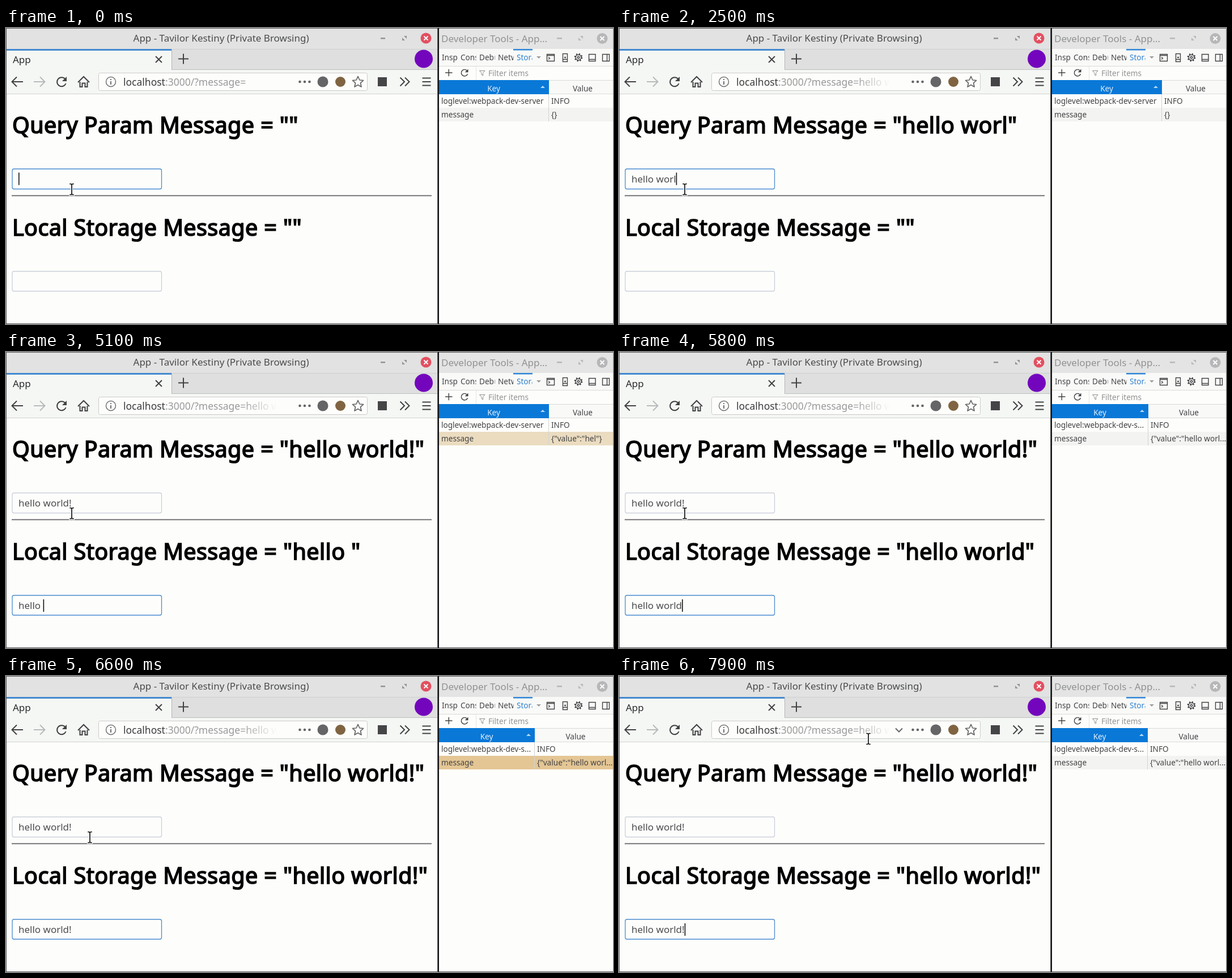
Animation of 1071 by 523 pixels, one loop 8 s. Source, as an HTML page:

```html
<!DOCTYPE html>
<html lang="en">
<head>
<meta charset="utf-8">
<title>App</title>
<style>
  html, body { margin: 0; width: 100%; height: 100%; overflow: hidden; }
  svg { display: block; }
  text { font: 17px "Noto Sans", "Open Sans", sans-serif; fill: #4b4b4d; white-space: pre; }
  /* a thin outline gives the semi-bold weight */
  .h1 { font-size: 39.5px; letter-spacing: .4px; fill: #000; stroke: #000; stroke-width: 1.7; }
  .url { font-size: 17.5px; fill: #98989a; }
  .small text, .small { font-size: 13.6px; fill: #424244; }
  .mid { text-anchor: middle; }
  .line { fill: none; stroke: #414143; stroke-width: 2; }
  .thin .line { stroke-width: 1.4; }
  .field { fill: #fdfefc; stroke-width: 1.3; }
</style>
</head>
<body>
<svg id="stage" width="1071" height="523" viewBox="0 0 1071 523">
  <defs>
    <linearGradient id="fade" gradientUnits="userSpaceOnUse" x1="415" x2="478">
      <stop stop-color="#fff"/><stop offset="1" stop-color="#fff" stop-opacity="0"/>
    </linearGradient>
    <mask id="fadeMask" maskUnits="userSpaceOnUse" x="200" y="75" width="300" height="40">
      <path d="M200 75H478V115H200z" fill="url(#fade)"/>
    </mask>
    <g id="reload"><path class="line" d="M6.2 -5A8 8 0 1 0 7.6 3"/><path d="M9 -9V-1H1z" fill="#414143"/></g>
    <g id="resize"><path d="M-1 -4H4V1zM-4 -1V4H1z"/></g>
    <path id="cross" d="M-3.5 -3.5L3.5 3.5M3.5 -3.5L-3.5 3.5" fill="none"/>
  </defs>

  <rect width="1071" height="523" fill="#56585a"/>
  <path d="M762 0H764V523H762z" fill="#161618"/>

  <!-- browser window -->
  <path d="M1 1H761V522H1z" fill="#fdfefb"/>
  <path d="M1 1H761V37H1z" fill="#e1e2e1"/>
  <path d="M1 37H761V73H1z" fill="#dedfde"/>
  <path d="M1 37.5H761" stroke="#cfcfd1"/>
  <text class="mid" x="379.5" y="24">App - Tavilor Kestiny (Private Browsing)</text>
  <g fill="#929294">
    <path d="M661 17H669V19.5H661z"/><use href="#resize" x="703" y="18"/>
  </g>
  <circle cx="741" cy="18" r="9.5" fill="#e34f60"/>
  <use href="#cross" x="741" y="18" stroke="#fff" stroke-width="2"/>
  <path d="M1 73.5H761" stroke="#bebec0"/>
  <path d="M1 37H292V74H1z" fill="#f5f7f4"/>
  <path d="M1 37H292V40H1z" fill="#4389d0"/>
  <path d="M292.5 38V73" stroke="#b4b4b6"/>
  <text x="12" y="62" style="fill:#2b2b2d">App</text>
  <path class="line" d="M264 50L275 61M275 50L264 61M304 54.5H322M313 45.5V63.5"/>
  <circle cx="737" cy="54.5" r="16" fill="#7306bd"/>

  <path d="M1 74H761V116H1z" fill="#f5f7f4"/>
  <path d="M1 116.5H761" stroke="#d1d2d0"/>
  <path class="line" d="M30 95H11M19 86.5L10.5 95L19 103.5"/>
  <path class="line" style="stroke:#b9b9bb" d="M49 95H68M60 86.5L68.5 95L60 103.5"/>
  <use href="#reload" x="98" y="95"/>
  <path class="line" d="M127 96L137 86L147 96M130.5 95V104H134.5V97.5H139.5V104H143.5V95"/>
  <rect x="163.5" y="79.5" width="474" height="31" rx="3" fill="#fdfefb" stroke="#cbccca"/>
  <circle class="line" style="stroke-width:1.5;stroke:#707072" cx="185" cy="95" r="8.5"/>
  <path d="M184 90H186V92H184zM184 94H186V100H184z" fill="#707072"/>
  <g id="address"><text class="url" x="207" y="102" id="url"><tspan fill="#3a3a3c">localhost</tspan>:3000/?message=<tspan id="query"></tspan></text></g>
  <path id="dropdown" class="line" style="stroke:#656567" d="M488 92.5L494 98.5L500 92.5"/>
  <g id="actions" fill="#656567">
    <circle cx="518.5" cy="95" r="2.3"/><circle cx="527" cy="95" r="2.3"/><circle cx="535.5" cy="95" r="2.3"/>
    <circle cx="559" cy="95" r="9.5"/>
  </g>
  <circle id="addon" cx="590" cy="95" r="9" fill="#806442"/>
  <path class="line" style="stroke:#656567;stroke-width:1.7" stroke-linejoin="round"
    d="M621 85.5L623.9 92L630.5 92.6L625.5 97.2L627 104L621 100.5L615 104L616.5 97.2L611.5 92.6L618.1 92z"/>
  <path d="M656 87H672V103H656z" fill="#454547"/>
  <path class="line" d="M695.5 87.5L703 95L695.5 102.5M704 87.5L711.5 95L704 102.5M734.5 88.5H749.5M734.5 95H749.5M734.5 101.5H749.5"/>

  <!-- page -->
  <text class="h1" x="11" y="186" id="head0"></text>
  <text class="h1" x="11" y="367" id="head1"></text>
  <rect class="field" id="field0" x="11" y="249" width="263.5" height="35.5" rx="3"/>
  <rect class="field" id="field1" x="11" y="430" width="263.5" height="35" rx="3"/>
  <text x="22" y="273" id="input0"></text>
  <text x="22" y="454" id="input1"></text>
  <path id="caret" d="M0 0H1.6V22H0z" fill="#111"/>
  <path d="M10 295.2H751V297.2H10z" fill="#777577"/>

  <!-- developer tools window -->
  <g class="small thin">
    <path d="M764 1H1071V522H764z" fill="#fdfefb"/>
    <path d="M764 1H1071V37H764z" fill="#e3e4e3"/>
    <text x="768" y="25" style="font-size:17px;fill:#929294">Developer Tools - App...</text>
    <g fill="#b7b7b9">
      <path d="M972 17H981V19.5H972z"/><use href="#resize" x="1014" y="18"/>
      <circle cx="1052" cy="18.5" r="9.5"/>
    </g>
    <use href="#cross" x="1052" y="18.5" stroke="#fff" stroke-width="2"/>
    <path d="M764 37H1071V67H764z" fill="#f9faf8"/>
    <path d="M895 37H929V39.5H895z" fill="#2f86d8"/>
    <g id="tabs"></g>
    <path d="M936 50H944L940 54z" fill="#9b9b9d"/>
    <path class="line" d="M954.5 46.5H967.5V58.5H954.5zM954.5 48.5H967.5M957 51.5L959.5 53.5L957 55.5M982.5 45.5H990.5V59.5H982.5zM982.5 55.5H990.5M1028.5 46.5H1040V58.5H1028.5zM1028.5 55.5H1040M1052.5 46.5H1064.5V58.5H1052.5zM1060.5 46.5V58.5"/>
    <circle cx="986.5" cy="52" r="1.5"/>
    <circle class="line" cx="1010" cy="52" r="4.8"/><circle class="line" cx="1010" cy="52" r="1.8"/>
    <circle class="line" style="stroke-width:2.2;stroke-dasharray:2.3 2.63" cx="1010" cy="52" r="6.28"/>
    <path d="M764 67.5H1071M764 92.5H1071" stroke="#d9dad8"/>
    <path class="line" d="M775 79H787.5M781.25 72.75V85.25"/>
    <use href="#reload" transform="translate(809 79) scale(.72)"/>
    <path d="M829.5 68V92" stroke="#e4e5e3"/>
    <path d="M835.5 75.5H845L841.5 79.5V84L839 82.5V79.5z" fill="none" stroke="#8c8c8e"/>
    <text x="851" y="84.5" style="fill:#929294">Filter items</text>

    <path d="M764 93H1071V117H764z" fill="#f9faf8"/>
    <path d="M764 116.5H1071" stroke="#dcdddb"/>
    <rect id="row" x="764" y="141" width="307" height="24"/>
    <path id="divider" d="M.5 93V165" stroke="#d3d4d2"/>
    <rect id="keyHead" x="764" y="92" height="25" fill="#0a78d7"/>
    <path id="sort" d="M-4 106L0 102L4 106z" fill="#b8daf6"/>
    <text class="mid" id="keyLabel" y="111.5" style="fill:#e3f0fb">Key</text>
    <text class="mid" id="valueLabel" y="111.5">Value</text>
    <text x="768" y="133.5" id="logKey"></text>
    <text x="768" y="158">message</text>
    <text id="logValue" y="133.5">INFO</text>
    <text id="value" y="158"></text>
  </g>

  <g id="mouse" fill="none" stroke-linecap="square">
    <path d="M-3 -9.5H-1.5L0 -8.5L1.5 -9.5H3M0 -8.5V8.5M-3 9.5H-1.5L0 8.5L1.5 9.5H3" stroke="#fff" stroke-width="4"/>
    <path d="M-3 -9.5H-1.5L0 -8.5L1.5 -9.5H3M0 -8.5V8.5M-3 9.5H-1.5L0 8.5L1.5 9.5H3" stroke="#111" stroke-width="1.7"/>
  </g>
</svg>

<script>
const $ = id => document.getElementById(id);
const set = (id, attrs) => { for (const k in attrs) $(id).setAttribute(k, attrs[k]); };
const write = (id, text) => { if ($(id).textContent !== text) $(id).textContent = text; };
const show = (id, on) => set(id, { visibility: on ? "visible" : "hidden" });

const LOOP = 8000, PHRASE = "hello world!";
const KEYS = [
  [500, 800, 1000, 1300, 1500, 1800, 2000, 2100, 2300, 2500, 2800, 3000],
  [4000, 4200, 4500, 4700, 4900, 5100, 5300, 5600, 5600, 5800, 5800, 6000]
];
const MOUSE = [[6500, 116, 285], [6600, 148, 285], [6700, 190, 281], [6900, 270, 240],
  [7100, 345, 182], [7300, 405, 132], [7500, 438, 112], [7700, 440, 111]];
const FLASHES = [4700, 5900, 6500], FLASH_TIME = 600;

$("tabs").innerHTML = ["Inspector", "Console", "Debugger", "Network", "Storage"].map((name, i) =>
  `<svg x="${769 + 33 * i}" y="40" width="27.5" height="26"><text y="16.5"${
    i === 4 ? ' style="fill:#2f7fd0"' : ""}>${name}</text></svg>`).join("");

const typed = (field, t) => PHRASE.slice(0, KEYS[field].filter(k => k <= t).length);

function mouseAt(t) {
  const next = MOUSE.findIndex(p => p[0] > t);
  if (next === 0) return MOUSE[0].slice(1);
  if (next < 0) return MOUSE.at(-1).slice(1);
  const [a, b] = [MOUSE[next - 1], MOUSE[next]], u = (t - a[0]) / (b[0] - a[0]);
  return [a[1] + (b[1] - a[1]) * u, a[2] + (b[2] - a[2]) * u];
}

function rowColour(t) {
  const start = FLASHES.findLast(f => f <= t) ?? -LOOP;
  const u = Math.min(1, (t - start) / FLASH_TIME) ** 1.7;
  const from = [227, 196, 143], to = [243, 244, 241];
  return `rgb(${from.map((c, i) => Math.round(c + (to[i] - c) * u))})`;
}

function drawPage(t) {
  const focus = t < 3500 ? 0 : 1;
  ["Query Param", "Local Storage"].forEach((label, i) => {
    const text = typed(i, t);
    write("head" + i, `${label} Message = "${text}"`);
    write("input" + i, text);
    set("field" + i, { stroke: i === focus ? "#4a8bd0" : "#cccfdc" });
  });
  const x = 22 + (typed(focus, t) ? $("input" + focus).getComputedTextLength() : 0);
  set("caret", { transform: `translate(${x} ${focus ? 437 : 255.5})` });
  show("caret", t < 6500 || t >= 7200);
}

function drawAddress(t) {
  const narrow = t >= 1300 && t < 1500;
  write("query", typed(0, t));
  const overflows = $("url").getComputedTextLength() > 268;
  set("address", { mask: overflows ? "url(#fadeMask)" : "none" });
  set("actions", { transform: `translate(${narrow ? 31 : 0})` });
  show("addon", !narrow);
  show("dropdown", t >= 7400);
}

function drawStorage(t) {
  const edge = t < 5800 ? 957 : t < 6500 ? 933 : 932;
  set("row", { fill: rowColour(t) });
  set("keyHead", { width: edge - 763 });
  set("divider", { transform: `translate(${edge})` });
  set("sort", { transform: `translate(${edge - 10})` });
  set("keyLabel", { x: (764 + edge) / 2 });
  set("valueLabel", { x: (edge + 1078) / 2 });
  set("logValue", { x: edge + 5 });
  set("value", { x: edge + 5 });
  write("logKey", t < 5800 ? "loglevel:webpack-dev-server" : "loglevel:webpack-dev-s...");
  write("value", t < 4700 ? "{}" : t < 5800 ? '{"value":"hel"}' : '{"value":"hello worl...');
}

function frame(now) {
  const t = Math.floor(now % LOOP / 100) * 100;
  drawPage(t);
  drawAddress(t);
  drawStorage(t);
  set("mouse", { transform: `translate(${mouseAt(t)})` });
  requestAnimationFrame(frame);
}
requestAnimationFrame(frame);
</script>
</body>
</html>
```
